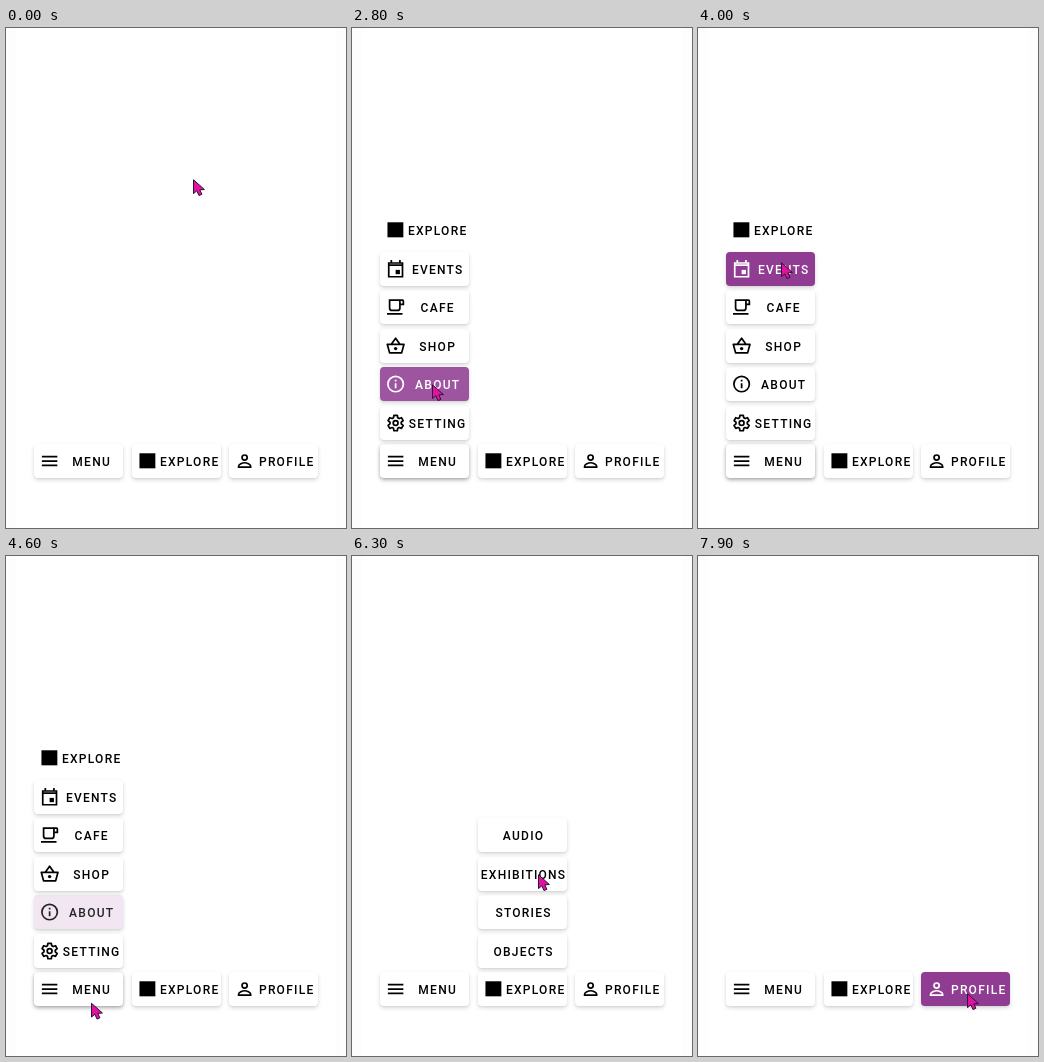
Write an HTML page that moves like this. It is 340 px wide and 500 px high and loops after 8 s.

```html
<!DOCTYPE html>
<html lang="en">
<head>
<meta charset="utf-8">
<title>Pop-up menu bar</title>
<style>
html, body { margin: 0; width: 100%; height: 100%; overflow: hidden; background: #fdfdfd; }
#stage { position: absolute; left: 0; top: 0; width: 340px; height: 500px; overflow: hidden; }
#page { position: absolute; left: 10px; width: 320px; height: 500px; background: #fff; }
.btn {
  --h: 0;
  position: absolute; width: 89px; height: 34px; border-radius: 4px;
  background: color-mix(in srgb, #903c92 calc(var(--h) * 100%), #fff);
  color: color-mix(in srgb, #fff min(var(--h) * 115%, 100%), #000);
  box-shadow: 0 2px 4px rgba(0,0,0,.15), 0 1px 2px rgba(0,0,0,.05);
}
.btn.bare { box-shadow: none; }
.btn.raised { box-shadow: 0 2px 4px rgba(0,0,0,.28), 0 1px 3px rgba(0,0,0,.12); }
svg { position: absolute; left: 0; top: 0; overflow: visible; }
text { font: 500 12px Roboto, Arial, sans-serif; letter-spacing: 1.25px; text-anchor: middle; fill: currentColor; }
.icon { fill: none; stroke: currentColor; stroke-width: 2; }
.icon .solid { fill: currentColor; stroke: none; }
</style>
</head>
<body>
<div id="stage">
  <div id="page"></div>
  <div id="bar"></div>
  <div id="menu"></div>
  <div id="explore"></div>
  <svg id="cursor" width="12" height="17">
    <path d="M.5 .8V14.6L3.8 11.8L6 16.6L8.9 15.3L6.8 10.9L11.4 10.5Z" fill="#e0129f" stroke="#2b1236"/>
  </svg>
</div>
<script>
const LOOP = 8000, STEP = 100, ROW = 38.5, BASE = 416, WIDTH = 89, HEIGHT = 34;
const $ = id => document.getElementById(id);
const clamp = v => Math.min(1, Math.max(0, v));

function gear() {
  let pts = '';
  for (let a = 30; a < 390; a += 60)
    for (const [turn, r] of [[-22, 6.6], [-12, 9.2], [12, 9.2], [22, 6.6]]) {
      const rad = (a + turn) * Math.PI / 180;
      pts += `${12 + r * Math.cos(rad)},${12 + r * Math.sin(rad)} `;
    }
  return `<polygon points="${pts}" stroke-linejoin="round"/><circle cx="12" cy="12" r="2.8"/>`;
}

const icons = {
  lines: '<path d="M3 7H21M3 12H21M3 17H21"/>',
  person: '<circle cx="12" cy="8" r="3"/><path d="M5 19v-1c0-2 4.5-4 7-4s7 2 7 4v1z"/>',
  date: '<path d="M4 5H20V21H4ZM4 7.5H20M7 1.5V5M17 1.5V5"/><path class="solid" d="M12 13h5v5h-5z"/>',
  cup: '<path d="M5 4H17V13a3 3 0 0 1-3 3H8a3 3 0 0 1-3-3ZM17 4h3q1 0 1 1v4H17M2 20H20"/>',
  basket: '<path d="M2.3 10H21.7L19 20H5ZM7 10L12 3L17 10" stroke-linejoin="round"/><circle class="solid" cx="12" cy="15" r="2"/>',
  info: '<circle cx="12" cy="12" r="9"/><path d="M12 11V17M12 7V9"/>',
  gear: gear(),
  mark: '<path class="solid" d="M2.5 3H21V20.5H2.5Z"/>'
};

function button(group, x, row, label, icon) {
  const el = document.createElement('div');
  const y = BASE - row * ROW;
  el.className = 'btn';
  el.style.left = x + 'px';
  el.style.top = y + 'px';
  const art = icon ? `<g class="icon" transform="translate(5.3 6.7) scale(.86)">${icons[icon]}</g>` : '';
  el.innerHTML = `<svg width="${WIDTH}" height="${HEIGHT}">${art}<text x="${icon ? 57.7 : 45.6}" y="22">${label}</text></svg>`;
  $(group).append(el);
  return { el, x, y };
}

const menuButton = button('bar', 28, 0, 'MENU', 'lines');
button('bar', 126, 0, 'EXPLORE', 'mark');
const profile = button('bar', 223, 0, 'PROFILE', 'person');

// pop-up items, bottom to top
const items = [['SETTING', 'gear'], ['ABOUT', 'info'], ['SHOP', 'basket'], ['CAFE', 'cup'], ['EVENTS', 'date'], ['EXPLORE', 'mark']]
  .map(([label, icon], i) => button('menu', 28, i + 1, label, icon));
const flat = items[items.length - 1];
const topics = ['OBJECTS', 'STORIES', 'EXHIBITIONS', 'AUDIO']
  .map((label, i) => button('explore', 126, i + 1, label));
const hoverable = [profile, ...items, ...topics];

// pointer stops: time, x, y
const stops = [
  [700, 187, 151], [1050, 262, 2], [1500, 191, 263], [1600, 112, 357], [1900, 73, 431],
  [2600, 73, 431], [2700, 79, 366], [2800, 80, 356], [3100, 82, 380], [3800, 84, 240],
  [4000, 83, 234], [4200, 84, 200], [4500, 84, 455], [4700, 86, 438], [5200, 177, 438],
  [6200, 177, 438], [6300, 186, 318], [6600, 184, 278], [7100, 180, 415], [7500, 178, 441],
  [7600, 178, 441], [7700, 225, 440], [7900, 269, 437]
];

function pointer(t) {
  const i = stops.findIndex(s => s[0] >= t);
  const [t1, x1, y1] = stops[i];
  const [t0, x0, y0] = stops[Math.max(0, i - 1)];
  const k = i ? (t - t0) / (t1 - t0) : 0;
  return [x0 + (x1 - x0) * k, y0 + (y1 - y0) * k];
}

function isOver(b, t) {
  const [x, y] = pointer(t);
  return x >= b.x && x <= b.x + WIDTH && y >= b.y && y <= b.y + HEIGHT;
}

// the tint follows the pointer with a short, eased delay
const tint = (b, t) => .87 * isOver(b, t - STEP) + .13 * isOver(b, t - 2 * STEP);

// fades in after start and out after end
const shown = (t, start, end) => clamp((t - start) / 200) * clamp(1 - (t - end) / 200);

function draw(t) {
  const [x, y] = pointer(t);
  $('cursor').style.transform = `translate(${x}px, ${y}px)`;
  $('menu').style.opacity = shown(t, 2000, 4700);
  $('explore').style.opacity = shown(t, 5300, 7600);
  menuButton.el.classList.toggle('raised', t > 2000 && t < 4900);
  for (const b of hoverable) b.el.style.setProperty('--h', tint(b, t));
  flat.el.classList.toggle('bare', tint(flat, t) === 0);
}

const begin = performance.now();
function tick() {
  const ms = (performance.now() - begin) % LOOP;
  draw(Math.floor(ms / STEP) * STEP);
  requestAnimationFrame(tick);
}
tick();
</script>
</body>
</html>
```
